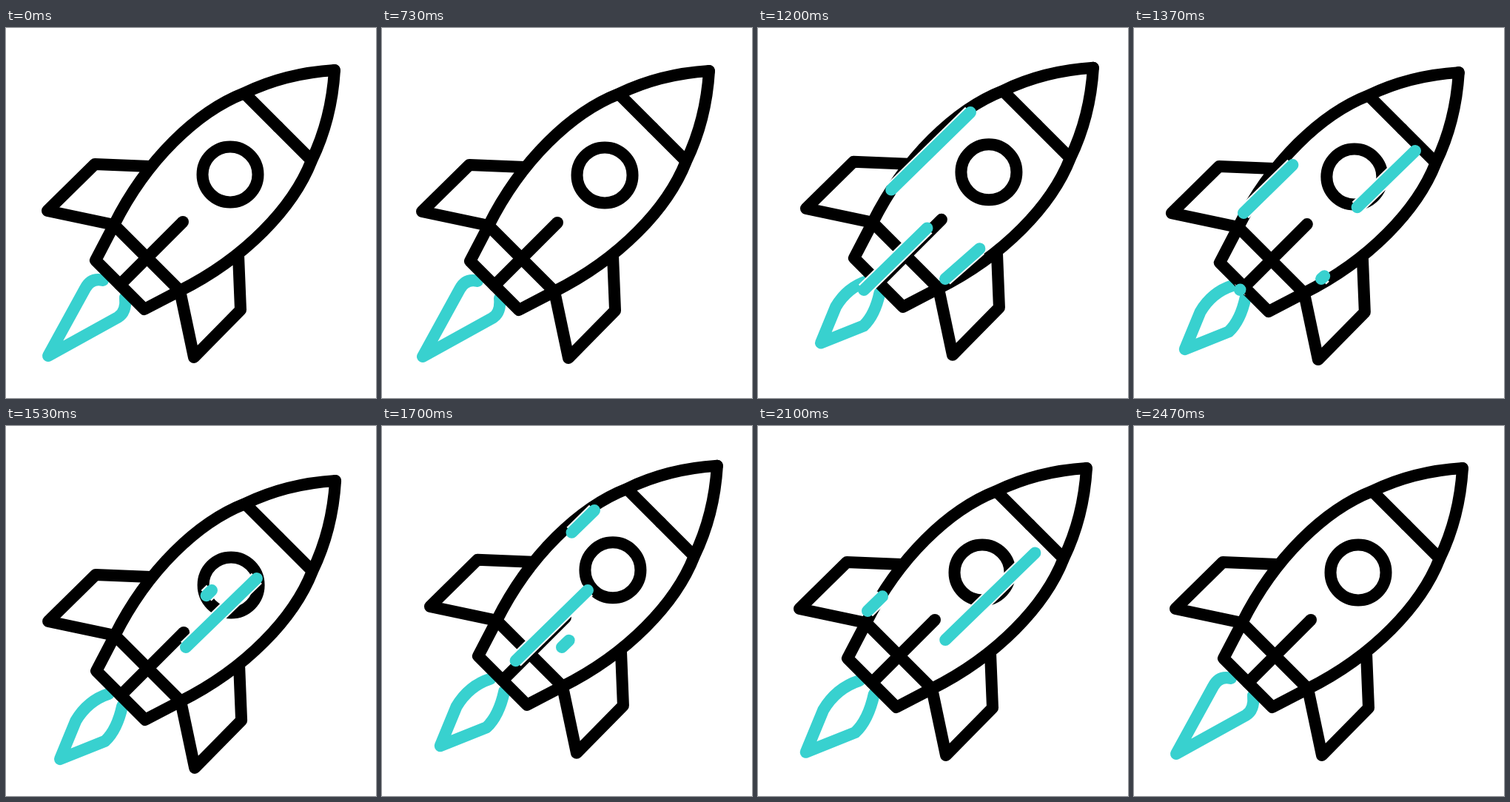
An HTML page for the animation above (2.51 s loop, 500 by 500 pixels).

```html
<!DOCTYPE html>
<html lang="en">
<head>
<meta charset="utf-8">
<title>Rocket</title>
<style>
html, body { margin: 0; width: 100%; height: 100%; overflow: hidden; background: #fff; }
svg { display: block; width: 100vw; height: 100vh; }
path, circle { fill: none; stroke-linecap: round; stroke-linejoin: round; }
#rocket { stroke: #000; stroke-width: 16; }
#flame, .streak { stroke: #38d1cf; stroke-width: 16; }
#gaps path { stroke: #fff; stroke-width: 20; stroke-linecap: butt; }
</style>
</head>
<body>
<svg viewBox="0 0 500 500">
  <g id="ship">
    <path id="flame"/>
    <g id="rocket">
      <path id="half" d="M444 57C395 60 355 72 322 88C258 113 190 178 146 266L121 314L154 347
        M324 90L367.5 133.5M146 266L190.5 310.5M194 187L120 184L56 247L146 266"/>
      <use href="#half" transform="matrix(0 -1 -1 0 501 501)"/>
      <path d="M239 262L156 345"/>
      <circle cx="303" cy="198" r="37.5"/>
    </g>
  </g>
  <g id="gaps"></g>
  <g id="streaks"></g>
</svg>
<script>
const LOOP = 2510, REPEAT = 640, GROW = 255, LAG = 225, FADE = 270;
const get = id => document.getElementById(id);
const clamp = v => Math.min(1, Math.max(0, v));
const mix = (a, b, k) => a + (b - a) * k;
const ramp = (t, from, to) => {
  const u = clamp((t - from) / (to - from));
  return u * u * (3 - 2 * u);
};

// start, control, shoulder, tip, shoulder, control, end
const calm = [[131, 341], [115, 337], [107, 352], [57, 443], [151, 391], [163, 384], [161, 364]];
const leaf = [[138, 345], [110, 354], [94, 381], [73, 432], [133, 408], [149, 393], [156, 361]];
const nozzle = [148, 352];

const streaks = [
  { from: [278, 222], to: [143, 354], first: 877, runs: 2 },
  { from: [287, 114], to: [148, 250], first: 1005, runs: 2 },
  { from: [320, 280], to: [253, 339], first: 893, runs: 1 },
  { from: [380, 166], to: [243, 299], first: 1225, runs: 2 }
];

function addPath(parent, name) {
  const p = document.createElementNS("http://www.w3.org/2000/svg", "path");
  p.setAttribute("class", name);
  get(parent).appendChild(p);
  return p;
}

for (const s of streaks) s.paths = [addPath("gaps", "gap"), addPath("streaks", "streak")];

// lean back a little, circle around, then settle
function shipOffset(t) {
  const a = 2 * Math.PI * (t - 1030) / 500, sin = Math.sin(a), cos = Math.cos(a);
  const away = ramp(t, 530, 730) * (1 - ramp(t, 1900, 2080));
  const orbit = ramp(t, 725, 920);
  const x = 1.8 + 8 * sin - 0.8 * cos;
  const y = 4 + 13 * cos + sin * (2.8 * sin - 2.4);
  return [away * mix(-2, x, orbit), away * mix(1, y, orbit)];
}

// the leaf shape slowly lengthens while it burns
function flamePath(t) {
  const burn = ramp(t, 740, 1010) * (1 - ramp(t, 2100, 2430));
  const size = mix(0.93, 1.11, clamp((t - 1030) / 1070));
  const p = calm.map((pt, i) => pt.map((v, j) =>
    mix(v, mix(nozzle[j], leaf[i][j], size), burn)).join(" "));
  return `M${p[0]}Q${p[1]} ${p[2]}L${p[3]}L${p[4]}Q${p[5]} ${p[6]}`;
}

function streakPath({ from, to, first, runs }, t) {
  const run = Math.floor((t - first) / REPEAT), age = t - first - run * REPEAT;
  if (run < 0 || run >= runs || age > LAG + FADE) return "";
  const point = k => from.map((v, i) => mix(v, to[i], k)).join(" ");
  return `M${point(clamp((age - LAG) / FADE))}L${point(clamp(age / GROW))}`;
}

function draw(t) {
  get("ship").setAttribute("transform", `translate(${shipOffset(t).join(" ")})`);
  get("flame").setAttribute("d", flamePath(t));
  for (const s of streaks) {
    const d = streakPath(s, t);
    s.paths.forEach(p => p.setAttribute("d", d));
  }
}

function tick() {
  draw(performance.now() % LOOP);
  requestAnimationFrame(tick);
}
tick();
</script>
</body>
</html>
```
